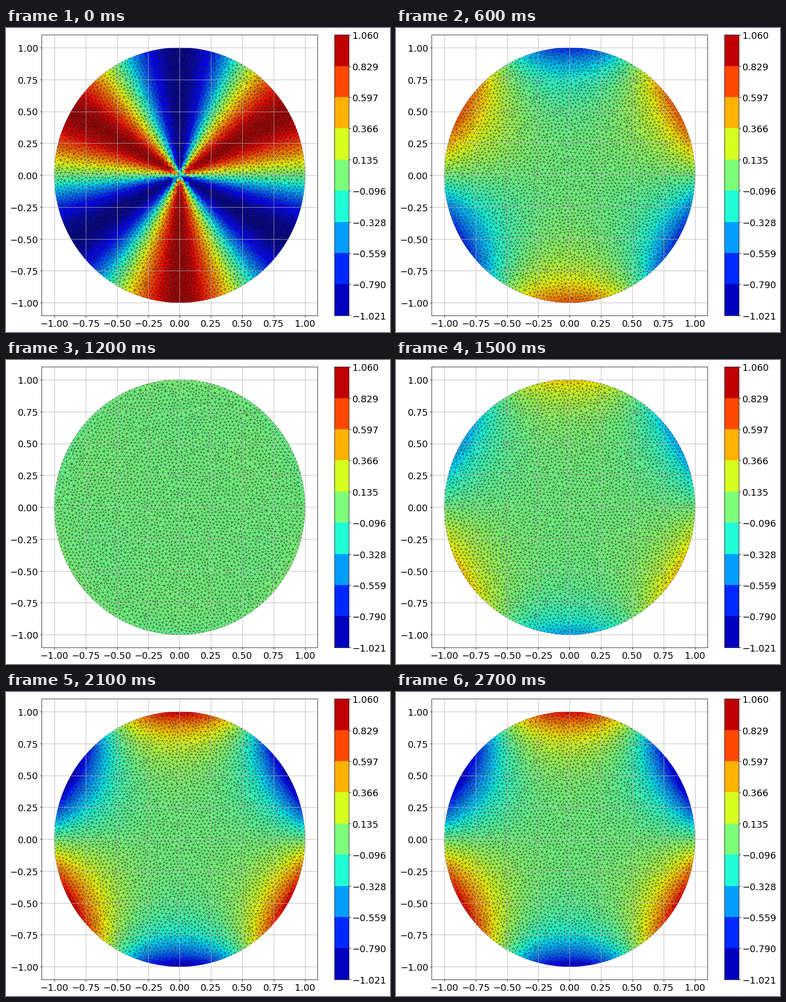
These frames come from a looping animation (746 px wide and 589 px high, 3 s). A matplotlib script:

```python
import numpy as np
import matplotlib.pyplot as plt
from matplotlib.animation import FuncAnimation
from matplotlib.transforms import ScaledTranslation
from matplotlib.tri import Triangulation

WIDTH, HEIGHT, DPI = 746, 589, 72
FRAMES, INTERVAL = 10, 300
LOW, HIGH = -1.0213, 1.0598
EDGE = 0.03
PHASE_STEP = 0.4
DIFFUSION, DAMPING, DRIFT = 0.14, 3.3, 0.6

plt.rcParams.update({"font.family": "DejaVu Sans", "font.size": 18})


def disk_mesh(edge, seed=4):
    """Irregular triangulation of the unit disk."""
    rng = np.random.default_rng(seed)
    rows = np.arange(-1, 1, edge * np.sqrt(3) / 2)
    cols = np.arange(-1, 1, edge)
    x, y = np.meshgrid(cols, rows)
    x[::2] += edge / 2
    inner = np.column_stack([x.ravel(), y.ravel()])
    inner += rng.uniform(-0.48, 0.48, inner.shape) * edge
    inner = inner[np.hypot(*inner.T) < 1 - 0.6 * edge]
    angle = np.linspace(0, 2 * np.pi, round(2 * np.pi / edge), endpoint=False)
    rim = np.column_stack([np.cos(angle), np.sin(angle)])
    points = np.vstack([inner, rim])

    for _ in range(3):
        a, b = Triangulation(*points.T).edges.T
        total = np.zeros_like(points)
        np.add.at(total, a, points[b])
        np.add.at(total, b, points[a])
        degree = np.bincount(np.r_[a, b], minlength=len(points))
        points[:len(inner)] = (total / degree[:, None])[:len(inner)]
    return Triangulation(*points.T)


def radial_profiles(count, n=240):
    """Implicit diffusion of the sin(3 theta) mode with an oscillating rim."""
    r = np.linspace(0, 1, n + 1)
    h = r[1]
    system = np.eye(n + 1)
    for i in range(1, n):
        system[i, i - 1] = -DIFFUSION * (1 / h**2 - 0.5 / (h * r[i]))
        system[i, i] = DAMPING + DIFFUSION * (2 / h**2 + 9 / r[i]**2)
        system[i, i + 1] = -DIFFUSION * (1 / h**2 + 0.5 / (h * r[i]))
    profiles = [np.ones(n + 1)]
    for k in range(1, count):
        rhs = profiles[-1].copy()
        rhs[0], rhs[-1] = 0, np.cos(PHASE_STEP * k)
        profiles.append(np.linalg.solve(system, rhs))
    return r, profiles


def pixel_axes(left, top, width, height):
    return fig.add_axes([left / WIDTH, 1 - (top + height) / HEIGHT,
                         width / WIDTH, height / HEIGHT])


def lower_labels(axis, pixels=0.9):
    shift = ScaledTranslation(0, -pixels / DPI, fig.dpi_scale_trans)
    for label in axis.get_ticklabels():
        label.set_transform(label.get_transform() + shift)


mesh = disk_mesh(EDGE)
radius = np.hypot(mesh.x, mesh.y)
theta = np.arctan2(mesh.y, mesh.x)
mode = np.sin(3 * theta)
skew = np.exp(DRIFT * (radius - 1) * np.cos(theta))
grid_r, profiles = radial_profiles(FRAMES)


def face_values(k):
    nodal = np.interp(radius, grid_r, profiles[k]) * mode
    if k > 0:
        nodal = nodal * skew
    return nodal[mesh.triangles].mean(axis=1)


fig = plt.figure(figsize=((WIDTH + 0.001) / DPI, (HEIGHT + 0.001) / DPI), dpi=DPI)
ax = pixel_axes(69.4, 13.3, 535.7, 543.6)
faces = ax.tripcolor(mesh, facecolors=face_values(0), cmap="jet", vmin=LOW,
                     vmax=HIGH, edgecolors="k", linewidth=0.3)
ticks = np.linspace(-1, 1, 9)
ax.set(xlim=(-1.1, 1.1), ylim=(-1.1, 1.1), xticks=ticks, yticks=ticks)
ax.grid(True)

# Banded colour scale
levels = np.linspace(LOW, HIGH, 10)
bar = pixel_axes(638.4, 13.3, 27.2, 543.6)
bar.pcolormesh([0, 1], levels, (levels[:-1] + levels[1:])[:, None] / 2,
               cmap="jet", vmin=LOW, vmax=HIGH)
bar.set(xlim=(0, 1), ylim=(LOW, HIGH), xticks=[])
bar.yaxis.tick_right()
bar.set_yticks(levels, [f"{v:.3f}".replace("-", "\u2212") for v in levels])

for axis in (ax.xaxis, ax.yaxis, bar.yaxis):
    lower_labels(axis)


def update(k):
    faces.set_array(face_values(k))
    return (faces,)


animation = FuncAnimation(fig, update, frames=FRAMES, interval=INTERVAL,
                          repeat=True, repeat_delay=0)
plt.show()
```
